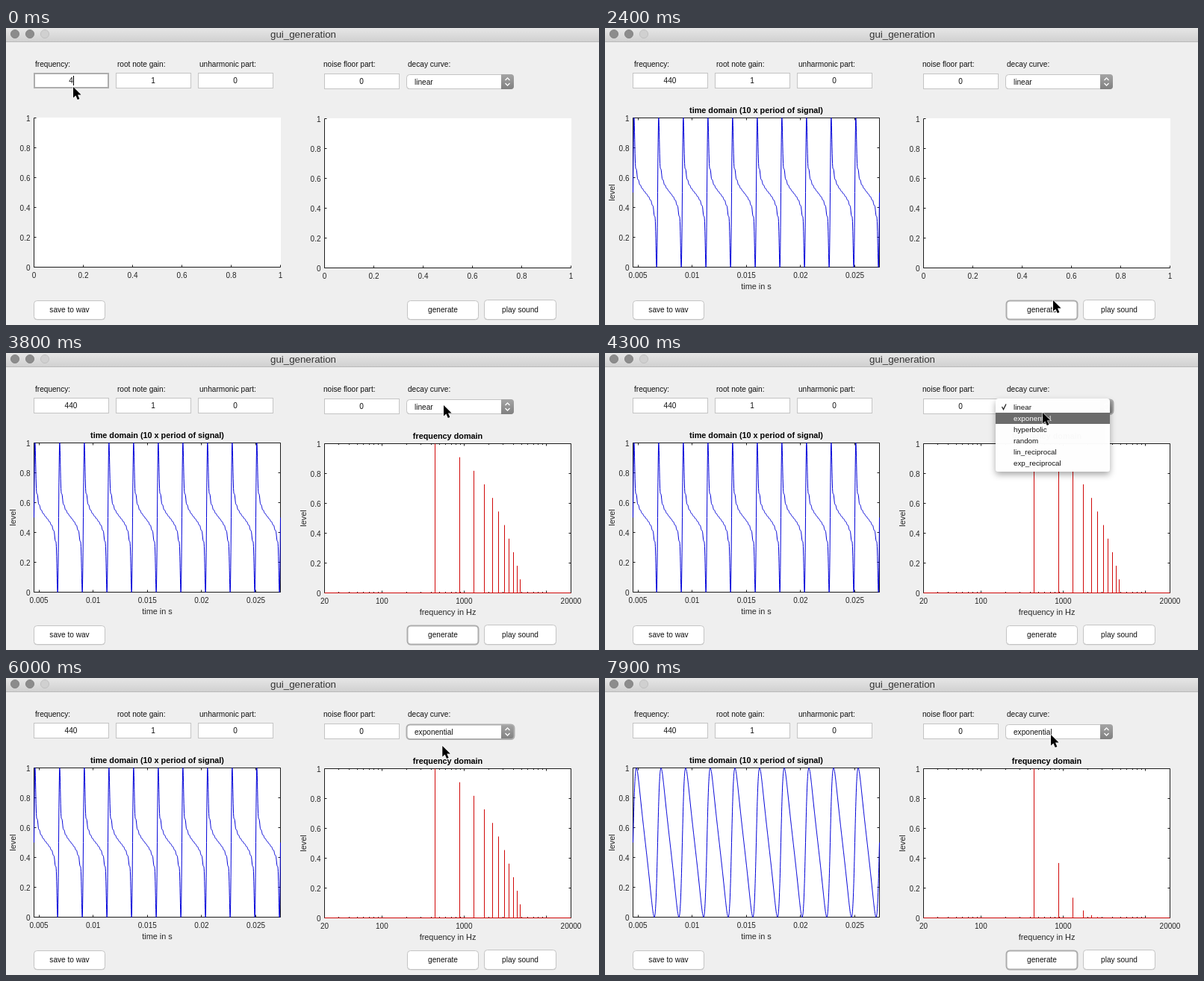
An HTML page that plays this animation: 794x398 px, repeating every 8000 ms.

```html
<!DOCTYPE html>
<html lang="en">
<head>
<meta charset="utf-8">
<title>gui_generation</title>
<style>
  html, body { margin: 0; width: 100%; height: 100%; overflow: hidden; background: #efefef; }
  svg { display: block; width: 794px; height: 398px; }
  text { font: 10.1px "Liberation Sans", Arial, sans-serif; fill: #111; white-space: pre; }
  .mid { text-anchor: middle; }
  .end { text-anchor: end; }
  .tick { font-size: 10px; fill: #262626; }
  .axis { font-size: 10.9px; fill: #262626; }
  .head { font-size: 10.85px; font-weight: bold; fill: #000; }
  .menu { font-size: 9.8px; }
  .line { fill: none; stroke: #1c1c1c; }
  .wave { fill: none; stroke: #0000d8; stroke-linejoin: round; }
  .spikes { fill: none; stroke: #d00808; }
  .box { fill: #fff; stroke: #c4c4c4; }
  .ring { fill: none; stroke: #adadad; stroke-width: 2; }
</style>
</head>
<body>
<svg id="stage" viewBox="0 0 794 398"></svg>
<script>
const LOOP = 8000, STEP = 100;
const PLOT_W = 330, PLOT_H = 200, PERIODS = 10;
const LEFT = { x: 37.5, y: 120.5 }, RIGHT = { x: 426.5, y: 121.5 };
const FIFTHS = [0, 0.2, 0.4, 0.6, 0.8, 1];
const CURVES = ['linear', 'exponential', 'hyperbolic', 'random', 'lin_reciprocal', 'exp_reciprocal'];

const text = (x, y, str, cls = '', extra = '') =>
  `<text x="${x}" y="${y}" class="${cls}" ${extra}>${str}</text>`;
const rect = (x, y, w, h, cls, extra = '') =>
  `<rect x="${x}" y="${y}" width="${w}" height="${h}" class="${cls}" ${extra}/>`;
const path = (d, cls, extra = '') => `<path d="${d}" class="${cls}" ${extra}/>`;
const group = (id, body) => `<g id="${id}">${body}</g>`;

const field = (x, y, value) =>
  rect(x + 0.5, y + 0.5, 100, 20, 'box') + (value === undefined ? '' : text(x + 50, y + 14, value, 'mid'));
const button = (x, y, w, h, label) =>
  rect(x + 0.5, y + 1.2, w, h, '', 'rx="4" fill="#bdbdbd"') +
  rect(x + 0.5, y + 0.5, w, h, 'box', 'rx="4"') + text(x + w / 2 + 0.5, 381, label, 'mid');

// Axes
const paper = o => rect(o.x - 0.5, o.y - 0.5, PLOT_W + 1, PLOT_H + 1, '', 'fill="#fff"');
const yLabels = o => FIFTHS.map(v => text(o.x - 5, o.y + 4 + PLOT_H * (1 - v), v, 'tick end')).join('');
const xLabel = (o, pos, str) => text(o.x + pos, o.y + 214.5, str, 'tick mid');
const yTicks = (o, both) => FIFTHS.map(v => {
  const y = o.y + PLOT_H * v;
  return `M${o.x} ${y}h3` + (both ? `M${o.x + PLOT_W} ${y}h-3` : '');
}).join('');
const xTick = (o, pos, len, both) => {
  const x = Math.round(o.x + pos - 0.5) + 0.5;
  return `M${x} ${o.y + PLOT_H}v${-len}` + (both ? `M${x} ${o.y}v${len}` : '');
};

function emptyPlot(o) {
  const ticks = FIFTHS.map(v => xTick(o, v * PLOT_W, 3)).join('');
  return paper(o) + path(`M${o.x} ${o.y}v${PLOT_H}h${PLOT_W}` + yTicks(o) + ticks, 'line') +
    yLabels(o) + FIFTHS.map(v => xLabel(o, v * PLOT_W, v)).join('');
}

function plotFrame(o, ticks, title, xName, labels) {
  const yMid = o.y + PLOT_H / 2;
  const levelX = o === LEFT ? 13 : 402;
  return paper(o) + path(`M${o.x} ${o.y}h${PLOT_W}v${PLOT_H}h${-PLOT_W}z` + yTicks(o, true) + ticks, 'line') +
    yLabels(o) + labels +
    text(o.x + PLOT_W / 2, o.y - 6.5, title, 'head mid') +
    text(o.x + PLOT_W / 2, o.y + 229.5, xName, 'axis mid') +
    text(levelX, yMid, 'level', 'axis mid', `transform="rotate(-90 ${levelX} ${yMid})"`);
}

// Signals: eleven harmonics of 440 Hz
const F0 = 440;
const harmonics = decay => Array.from({ length: 11 }, (_, i) => decay(i));
const LINEAR = harmonics(i => 1 - i / 11);
const EXPONENTIAL = harmonics(i => Math.exp(-i));

function timePlot(amps) {
  const n = 1600;
  const level = Array.from({ length: n + 1 }, (_, i) =>
    amps.reduce((sum, a, k) => sum + a * Math.sin((k + 1) * 2 * Math.PI * PERIODS * i / n), 0));
  const peak = Math.max(...level);
  const d = 'M' + level.map((v, i) =>
    `${(LEFT.x + i / n * PLOT_W).toFixed(2)} ${(LEFT.y + PLOT_H * (0.5 - v / peak / 2)).toFixed(2)}`).join('L');
  const marks = [0.005, 0.01, 0.015, 0.02, 0.025];
  const pos = s => (s * F0 - 2) / PERIODS * PLOT_W;
  return plotFrame(LEFT, marks.map(s => xTick(LEFT, pos(s), 3, true)).join(''),
    'time domain (10 x period of signal)', 'time in s',
    marks.map(s => xLabel(LEFT, pos(s), s)).join('')) + path(d, 'wave');
}

function spectrumPlot(amps) {
  const pos = hz => Math.log10(hz / 20) / 3 * PLOT_W;
  let ticks = '';
  for (const decade of [10, 100, 1000, 10000])
    for (let m = 1; m < 10; m++) {
      const hz = decade * m;
      if (hz > 20 && hz < 20000) ticks += xTick(RIGHT, pos(hz), m === 1 ? 3 : 1.5, true);
    }
  const base = RIGHT.y + PLOT_H;
  const spikes = amps.map((a, k) =>
    `M${Math.round(RIGHT.x + pos(F0 * (k + 1)) - 0.5) + 0.5} ${base}v${-a * PLOT_H}`).join('');
  return plotFrame(RIGHT, ticks, 'frequency domain', 'frequency in Hz',
    [20, 100, 1000, 20000].map(hz => xLabel(RIGHT, pos(hz), hz)).join('')) +
    path(`M${RIGHT.x} ${base}h${PLOT_W}` + spikes, 'spikes');
}

// Window
const titleBar =
  rect(0, 0, 794, 18, '', 'fill="url(#bar)"') + rect(0, 18, 794, 1, '', 'fill="#b9b9b9"') +
  [12, 32].map(x => `<circle cx="${x}" cy="8" r="5.6" fill="#8c8c8c" stroke="#7b7b7b" stroke-width=".8"/>`).join('') +
  '<circle cx="52" cy="8" r="5.6" fill="#d0d0d0" stroke="#bcbcbc" stroke-width=".8"/>' +
  text(398, 13, 'gui_generation', 'mid', 'style="font-size:13.3px;fill:#333"');

const labels =
  text(39, 52, 'frequency:') + text(149, 52, 'root note gain:') + text(259, 51.5, 'unharmonic part:') +
  text(425, 52, 'noise floor part:') + text(538, 52, 'decay curve:');

const popup =
  rect(536.5, 63, 143, 19, '', 'rx="4" fill="#b4b4b4"') +
  rect(536.5, 62.5, 143, 19, 'box', 'rx="4"') +
  path('M663 62h13a4 4 0 0 1 4 4v12a4 4 0 0 1-4 4h-13z', '', 'fill="url(#knob)"') +
  path('M668.5 70l3-3 3 3M668.5 74l3 3 3-3', '', 'fill="none" stroke="#fff" stroke-width="1.3"') +
  '<text id="choice" x="547" y="76"></text>' +
  group('popupRing', rect(536.5, 62.5, 144, 19.5, 'ring', 'rx="4.5"'));

const menu =
  rect(523, 61, 153, 98, '', 'rx="4" fill="#fff" fill-opacity=".97" filter="url(#shadow)"') +
  rect(523, 80, 153, 15, '', 'id="highlight" fill="#6b6b6b"') +
  path('M531.5 72l2 3.5 3.5-7', '', 'id="check" fill="none" stroke="#222" stroke-width="1.3"') +
  CURVES.map((name, i) => text(547, 76 + 15 * i, name, 'menu item')).join('');

const stage = document.getElementById('stage');
stage.innerHTML = `<defs>
  <linearGradient id="bar" x2="0" y2="1"><stop stop-color="#e6e6e6"/><stop offset="1" stop-color="#d1d1d1"/></linearGradient>
  <linearGradient id="knob" x2="0" y2="1"><stop stop-color="#a5a5a5"/><stop offset="1" stop-color="#808080"/></linearGradient>
  <filter id="shadow" x="-10%" y="-10%" width="120%" height="135%"><feDropShadow dx="0" dy="4" stdDeviation="4" flood-opacity=".35"/></filter>
  </defs>` +
  rect(0, 0, 794, 398, '', 'fill="#efefef"') + titleBar + labels +
  field(37, 60) + group('fieldRing', rect(38, 61, 99, 19, 'ring')) +
  '<text id="freq" x="87" y="74" class="mid"></text>' + rect(0, 64, 1, 13, '', 'id="caret"') +
  field(147, 60, 1) + field(257, 60, 0) + field(426, 61, 0) + popup +
  group('emptyLeft', emptyPlot(LEFT)) + group('emptyRight', emptyPlot(RIGHT)) +
  group('timeLinear', timePlot(LINEAR)) + group('timeExp', timePlot(EXPONENTIAL)) +
  group('specLinear', spectrumPlot(LINEAR)) + group('specExp', spectrumPlot(EXPONENTIAL)) +
  button(37, 365, 95, 25, 'save to wav') + button(537, 365, 95, 25, 'generate') +
  button(640, 364, 96, 26, 'play sound') +
  group('buttonRing', rect(537.5, 365.5, 95, 25, 'ring', 'rx="4.5"')) +
  group('menu', menu) +
  path('M0 0V14.5L3.4 11.4L5.8 17L8.4 15.9L6 10.5H10.6Z', '',
    'id="pointer" fill="#000" stroke="#fff" stroke-width="1.1" paint-order="stroke"');

// Pointer path: time, x, y
const POINTER = [
  [0, 90, 79], [700, 90, 79], [1600, 600, 365], [2700, 600, 365], [3000, 600, 298],
  [3600, 586, 70], [3900, 586, 70], [4200, 586, 80], [4800, 586, 80], [4900, 585, 72],
  [5100, 588, 238], [5300, 584, 68], [5900, 584, 68], [6500, 588, 379], [6800, 594, 367],
  [7200, 594, 367], [7700, 597, 76], [LOOP, 597, 76]
];

function pointerAt(t) {
  const i = POINTER.findIndex(key => key[0] > t);
  const [t0, x0, y0] = POINTER[i - 1], [t1, x1, y1] = POINTER[i];
  const p = (t - t0) / (t1 - t0), e = p * p * (3 - 2 * p);
  return [x0 + (x1 - x0) * e, y0 + (y1 - y0) * e];
}

const el = id => document.getElementById(id);
const show = (id, on) => { el(id).style.display = on ? '' : 'none'; };

function draw(t) {
  const within = (from, to) => t >= from && t < to;
  const typed = t < 100 ? '4' : t < 300 ? '44' : '440';
  el('freq').textContent = typed;
  el('caret').setAttribute('x', Math.round(87 + typed.length * 2.9));
  show('caret', t < 1900 && !within(800, 1300) && !within(1800, 1900));
  show('fieldRing', t < 1900);

  show('emptyLeft', t < 2400);
  show('emptyRight', t < 2800);
  show('timeLinear', within(2400, 7400));
  show('specLinear', within(2800, 7500));
  show('timeExp', t >= 7400);
  show('specExp', t >= 7500);

  show('buttonRing', within(1900, 3900) || t >= 7000);
  show('popupRing', within(3900, 7000));
  show('menu', within(3900, 4700));
  el('choice').textContent = CURVES[t < 4700 ? 0 : 1];
  const hovered = t < 4100 ? 0 : 1;
  el('highlight').setAttribute('y', 65 + 15 * hovered);
  document.querySelectorAll('.item').forEach((item, i) => { item.style.fill = i === hovered ? '#fff' : ''; });
  el('check').setAttribute('stroke', hovered === 0 ? '#fff' : '#222');

  const [x, y] = pointerAt(t);
  el('pointer').setAttribute('transform', `translate(${x.toFixed(1)} ${y.toFixed(1)})`);
}

function tick() {
  draw(Math.floor(performance.now() % LOOP / STEP) * STEP);
  requestAnimationFrame(tick);
}
tick();
</script>
</body>
</html>
```
